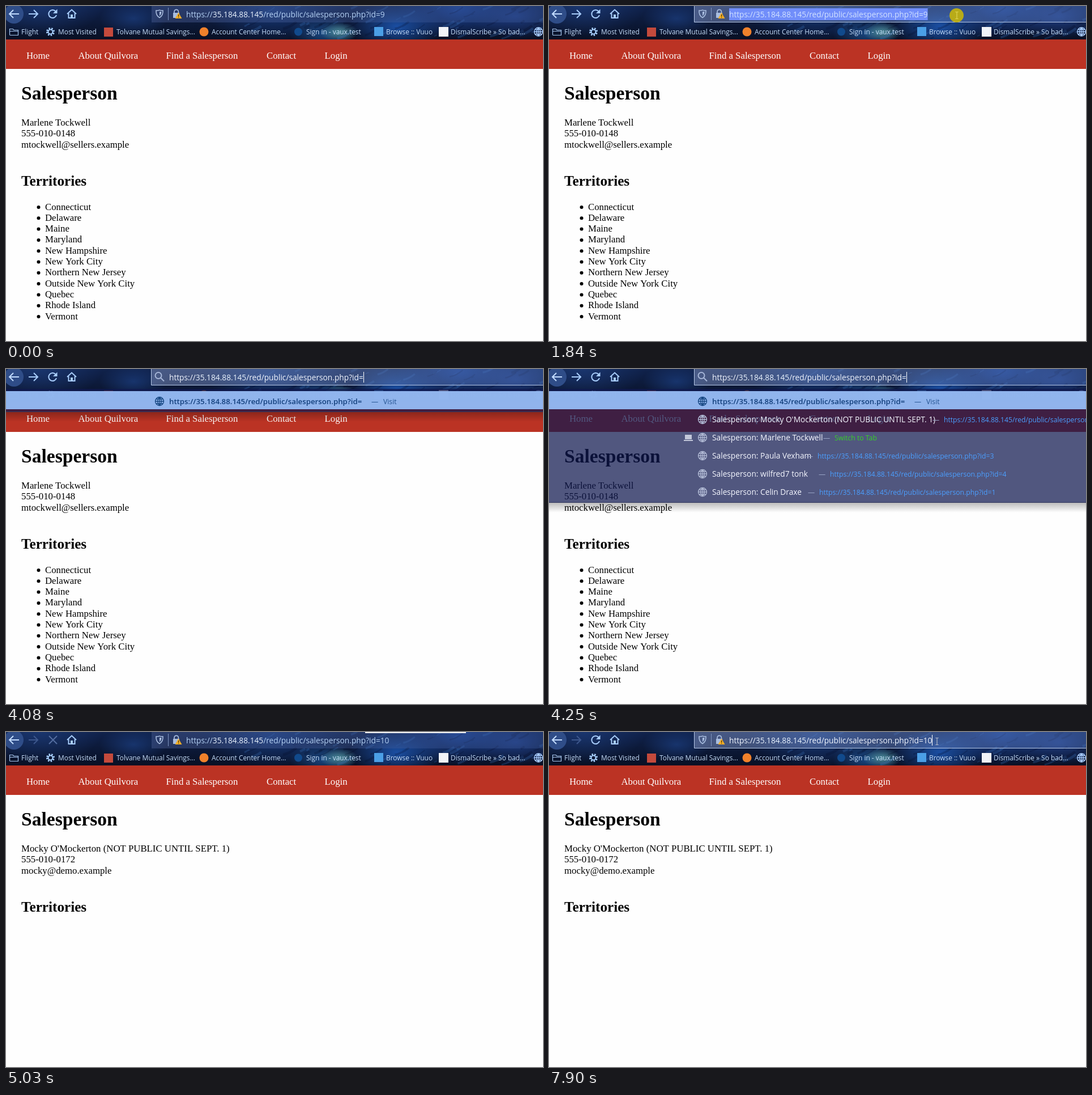
These frames come from a looping animation (948 by 591 pixels, 8 s). An HTML page with a canvas:

```html
<!DOCTYPE html>
<html lang="en">
<head>
<meta charset="utf-8">
<title>Salesperson</title>
<style>
  html, body { margin: 0; width: 100%; height: 100%; overflow: hidden; background: #fefefe; }
  canvas { display: block; width: 948px; height: 591px; }
</style>
</head>
<body>
<canvas id="stage" width="948" height="591"></canvas>
<script>
const ctx = document.getElementById('stage').getContext('2d');
const W = 948, H = 591, LOOP = 8000, TAU = Math.PI * 2;
const SERIF = '"Liberation Serif", "Times New Roman", serif';
const SANS = '"Open Sans", "Noto Sans", sans-serif';
const ICON = '#a8cdfb', DIM = '#3d578c';
const HOST = '35.184.88.145', PATH = '/red/public/salesperson.php?id=';
const URL_BASE = 'https://' + HOST + PATH;

const PEOPLE = {
  9: {
    lines: ['Marlene Tockwell', '555-010-0148', 'mtockwell@sellers.example'],
    territories: ['Connecticut', 'Delaware', 'Maine', 'Maryland', 'New Hampshire', 'New York City',
      'Northern New Jersey', 'Outside New York City', 'Quebec', 'Rhode Island', 'Vermont']
  },
  10: {
    lines: ["Mocky O'Mockerton (NOT PUBLIC UNTIL SEPT. 1)", '555-010-0172', 'mocky@demo.example'],
    territories: []
  }
};
const SUGGESTIONS = [
  { title: PEOPLE[10].lines[0], dash: 677, id: 10 },
  { title: PEOPLE[9].lines[0], dash: 484, open: true },
  { title: 'Paula Vexham', dash: 454, id: 3 },
  { title: 'wilfred7 tonk', dash: 476, id: 4 },
  { title: 'Celin Draxe', dash: 457, id: 1 }
];

// Latest value whose start time has passed.
const at = (t, steps) => steps.reduce((value, [start, next]) => t >= start ? next : value, null);

const QUERY = [[0, '9'], [4010, ''], [4320, '1'], [4570, '10']];
const MENU_ROWS = [[0, 0], [4010, 1], [4250, 6], [4650, 2], [4800, 0]];
const PERSON = [[0, 9], [4950, 10]];
const FOCUS = [[0, false], [1360, true], [4800, false], [7200, true]];
const SELECTED = [[0, false], [1360, true], [1910, false], [7280, true], [7900, false]];
const CARET = [[0, false], [2460, true], [2920, false], [3390, true], [4800, false], [7900, true]];
const HALO = [[0, false], [1360, true], [1440, false], [1840, true], [1910, false], [7200, true], [7350, false]];
const LOADING = [[0, 'ready'], [4800, 'stop'], [5410, 'wait'], [5730, 'ready']];
const POINTER = [[0, null], [290, ['arrow', 838, 556]], [370, ['arrow', 826, 250]], [440, ['arrow', 806, 47]],
  [750, ['arrow', 770, 46]], [830, ['arrow', 650, 36]], [900, ['beam', 560, 18]], [980, ['beam', 620, 16]],
  [1060, ['beam', 690, 16]], [1130, ['beam', 720, 16]], [3470, ['beam', 722, 6]], [3550, null],
  [6580, ['beam', 640, 4]], [6660, ['beam', 648, 10]], [6740, ['beam', 657, 16]],
  [6900, ['beam', 668, 16]], [6970, ['beam', 678, 16]], [7050, ['beam', 685, 16]]];

function text(str, x, y, size, color, family = SANS, weight = '400') {
  ctx.font = `${weight} ${size}px ${family}`;
  ctx.fillStyle = color;
  ctx.fillText(str, x, y);
  return x + ctx.measureText(str).width;
}
function rect(x, y, w, h, color) {
  ctx.fillStyle = color;
  ctx.fillRect(x, y, w, h);
}
function disc(x, y, r, color) {
  ctx.fillStyle = color;
  ctx.beginPath();
  ctx.arc(x, y, r, 0, TAU);
  ctx.fill();
}
function stroke(path, color, width = 1.8) {
  ctx.strokeStyle = color;
  ctx.lineWidth = width;
  ctx.stroke(new Path2D(path));
}
function fill(path, color) {
  ctx.fillStyle = color;
  ctx.fill(new Path2D(path));
}
function globe(x, y, color, r = 7.5) {
  stroke(`M${x - r} ${y}a${r} ${r} 0 1 0 ${2 * r} 0a${r} ${r} 0 1 0 ${-2 * r} 0h${2 * r}
    M${x} ${y - r}v${2 * r}M${x} ${y - r}q-7 ${r} 0 ${2 * r}q7 ${-r} 0 ${-2 * r}
    M${x - 6} ${y - 4}h12M${x - 6} ${y + 4}h12`, color, 1.3);
}

function drawWallpaper() {
  const base = ctx.createLinearGradient(0, 0, 0, 59);
  base.addColorStop(0, '#10224c');
  base.addColorStop(1, '#081024');
  rect(0, 0, W, 59, base);
  ctx.save();
  ctx.beginPath();
  ctx.rect(0, 0, W, 59);
  ctx.clip();
  const clouds = [[60, 0, 110, '28,58,118'], [225, 22, 60, '26,58,120'], [470, 5, 120, '24,62,132'],
    [560, 48, 60, '30,84,150'], [588, 46, 34, '90,160,165'], [690, 36, 85, '30,92,190'],
    [800, 4, 110, '30,72,160'], [900, 18, 80, '34,66,142']];
  for (const [x, y, r, rgb] of clouds) {
    ctx.save();
    ctx.translate(x, y);
    ctx.scale(1, 0.5);
    const glow = ctx.createRadialGradient(0, 0, 0, 0, 0, r);
    glow.addColorStop(0, `rgba(${rgb},.8)`);
    glow.addColorStop(1, `rgba(${rgb},0)`);
    disc(0, 0, r, glow);
    ctx.restore();
  }
  let seed = 7;
  const random = () => (seed = seed * 16807 % 2147483647) / 2147483647;
  for (let i = 0; i < 70; i++) {
    const x = 420 + random() * 528, y = random() * 58, length = 4 + random() * 22;
    const tone = random() < 0.5 ? '5,10,35' : '70,130,215';
    stroke(`M${x} ${y}q${length / 2} -2 ${length} ${-length / 2}`, `rgba(${tone},.22)`, 1 + random() * 4);
  }
  ctx.restore();
}

function drawButtons(loading, canForward) {
  disc(14, 14, 17, '#2f4d88');
  stroke('M6 14H23M13 7L6 14L13 21', '#c2dcff', 2);
  stroke('M40 14H56M49 7L56 14L49 21', canForward ? ICON : DIM, 2);
  if (loading === 'stop') {
    stroke('M76 7L90 21M90 7L76 21', '#536c9f', 2);
  } else {
    const color = loading === 'wait' ? '#536c9f' : ICON;
    stroke('M88 10A7 7 0 1 0 89 16', color, 2);
    fill('M90.5 5.5V13H83Z', color);
  }
  stroke('M108 14L116 6.5L124 14M110.5 13V21H121.5V13', ICON, 2);
  rect(114, 15, 4, 6, ICON);
}

function drawBookmarks(hovered) {
  if (hovered) rect(760, 35, 164, 22, 'rgba(150,180,235,.3)');
  const label = (str, x) => text(str, x, 50, 11.9, '#c5dcf8');
  stroke('M6.5 51V40.5H12L14 42.5H21.5V51.5H6.5M6.5 44.5H21.5', '#a9c8f0', 1.2);
  label('Flight', 27);
  ctx.setLineDash([2.4, 2.3]);
  stroke('M72.5 45.5a6 6 0 1 0 12 0a6 6 0 1 0 -12 0', '#a8d0ff', 3);
  ctx.setLineDash([]);
  stroke('M74.5 45.5a4 4 0 1 0 8 0a4 4 0 1 0 -8 0', '#a8d0ff', 2);
  label('Most Visited', 92);
  rect(173, 38, 16, 16, '#c44a3c');
  label('Tolvane Mutual Savings...', 195);
  disc(349.5, 45.5, 8, '#f0812b');
  label('Account Center Home...', 363);
  disc(516, 45.5, 7, '#114a8c');
  label('Sign in - vaux.test', 530);
  rect(650, 37, 16, 16, '#4b9fe6');
  label('Browse :: Vuuo', 671);
  rect(764, 37, 17, 17, '#f1f3f8');
  label('DismalScribe » So bad...', 785);
  globe(940, 45.5, '#a9cdff');
}

function drawAddress({ query, focus, selected, caret, typing }) {
  const tint = ctx.createLinearGradient(257, 0, W, 0);
  tint.addColorStop(0, focus ? 'rgba(128,145,190,.5)' : 'rgba(84,102,158,.38)');
  tint.addColorStop(1, focus ? 'rgba(84,118,190,.4)' : 'rgba(64,94,160,.3)');
  rect(257, 0, W - 257, 29, tint);
  if (focus) stroke('M256.5 0V28.5H948', '#b7c9e8', 1);
  const x = typing ? 288 : 318;
  if (typing) {
    stroke('M263.5 11.5a5.5 5.5 0 1 0 11 0a5.5 5.5 0 1 0 -11 0M273 15.5L279 21.5', '#a6b6d8', 2);
  } else {
    stroke('M265 8Q271 8 271 6.5Q271 8 277 8Q277.5 17 271 20.5Q264.5 17 265 8Z', '#a9bddf', 1.6);
    fill('M271 10H274.5Q274.5 15 271 17.5Z', '#a9bddf');
    rect(286, 3, 1, 22, '#7e94bf');
    stroke('M297 13V10a3.7 3.7 0 0 1 7.4 0V13', '#a9bddf', 1.7);
    rect(295, 12, 11, 9, '#a9bddf');
    fill('M304.5 11.5L310.5 22H298.5Z', '#f3ad27');
    rect(304, 15, 1.2, 3.5, '#3b2c08');
    rect(304, 19.5, 1.2, 1.2, '#3b2c08');
  }
  ctx.font = `400 13.72px ${SANS}`;
  const end = x + ctx.measureText(URL_BASE + query).width;
  if (selected) rect(x, 4, end - x, 21, '#718efa');
  const soft = selected ? '#d2e2ff' : focus ? '#f0f5ff' : '#b4d1f4';
  const strong = selected ? '#d2e2ff' : '#e9f3ff';
  const hostX = text('https://', x, 20, 13.72, soft);
  const pathX = text(HOST, hostX, 20, 13.72, strong);
  text(PATH + query, pathX, 20, 13.72, soft);
  if (caret) rect(Math.round(end), 5, 1, 19, '#fff');
}

function drawPage(id) {
  const { lines, territories } = PEOPLE[id];
  rect(0, 59, W, 52, '#bb3324');
  [['Home', 36], ['About Quilvora', 127.5], ['Find a Salesperson', 282.5], ['Contact', 460], ['Login', 562.5]]
    .forEach(([label, x]) => text(label, x, 92.5, 16.8, '#fff', SERIF));
  text('Salesperson', 27, 165, 33.6, '#000', SERIF, '700');
  lines.forEach((line, i) => text(line, 27, 211 + i * 19.3, 16.8, '#000', SERIF));
  text('Territories', 27, 316.5, 25.2, '#000', SERIF, '700');
  territories.forEach((name, i) => {
    disc(57.5, 355 + i * 19.3, 3, '#000');
    text(name, 69, 359.5 + i * 19.3, 16.8, '#000', SERIF);
  });
}

function drawMenu(rows, query) {
  const bottom = 44 + rows * 32;
  const shadow = ctx.createLinearGradient(0, bottom, 0, bottom + 17);
  shadow.addColorStop(0, 'rgba(0,0,0,.26)');
  shadow.addColorStop(1, 'rgba(0,0,0,0)');
  rect(0, bottom, W, 17, shadow);
  rect(0, 35, W, bottom - 35, 'rgba(16,24,79,.72)');
  rect(0, bottom - 1, W, 1, '#30365d');
  rect(0, 39, W, 32, 'rgba(149,187,243,.96)');
  globe(271, 57, '#174883');
  text(URL_BASE + query, 288, 62, 13.25, '#123f7c', SANS, '600');
  text('—', 645, 62, 12.2, '#245391');
  text('Visit', 666, 62, 12.2, '#245391');
  SUGGESTIONS.slice(0, rows - 1).forEach(({ title, dash, id, open }, i) => {
    const y = 89 + i * 32;
    globe(271, y, '#aeb7d2');
    text('Salesperson: ' + title, 288, y + 5, 13.72, '#f5f7ff');
    text('—', dash, y + 5, 12.2, '#9ca7c9');
    if (open) {
      rect(240, y - 5, 12, 8, '#c3c8da');
      rect(238, y + 4, 16, 2, '#c3c8da');
      text('Switch to Tab', 504, y + 5, 12.2, '#36d225');
    } else {
      text(URL_BASE + id, dash + 20, y + 5, 12.2, '#4b9fff');
    }
  });
}

function drawPointer([kind, x, y], halo) {
  if (halo) disc(x - 0.5, y + 0.5, 12.5, '#b8ab19');
  if (kind === 'beam') {
    stroke(`M${x - 2.5} ${y - 5.5}h2l.5 .5l.5 -.5h2M${x} ${y - 5}V${y + 6}
      M${x - 2.5} ${y + 6.5}h2l.5 -.5l.5 .5h2`, halo ? '#e7dc58' : '#c6cbd3', 1);
  } else {
    const arrow = `M${x} ${y}v16l4 -4l3 6l2.5 -1l-3 -6h5Z`;
    fill(arrow, '#fff');
    stroke(arrow, '#000', 1);
  }
}

function draw(t) {
  const query = at(t, QUERY), rows = at(t, MENU_ROWS), person = at(t, PERSON), pointer = at(t, POINTER);
  rect(0, 0, W, H, '#fefefe');
  drawWallpaper();
  drawPage(person);
  drawButtons(at(t, LOADING), person === 9);
  drawBookmarks(t >= 440 && t < 830);
  drawAddress({
    query, focus: at(t, FOCUS), selected: at(t, SELECTED),
    caret: at(t, CARET), typing: rows > 0
  });
  if (rows) drawMenu(rows, query);
  if (t >= 4950 && t < 6190) rect(634, 0, 178, 2, '#f4f4f4');
  if (pointer) drawPointer(pointer, at(t, HALO));
}

const start = performance.now();
function tick() {
  draw((performance.now() - start) % LOOP);
  requestAnimationFrame(tick);
}
tick();
</script>
</body>
</html>
```
